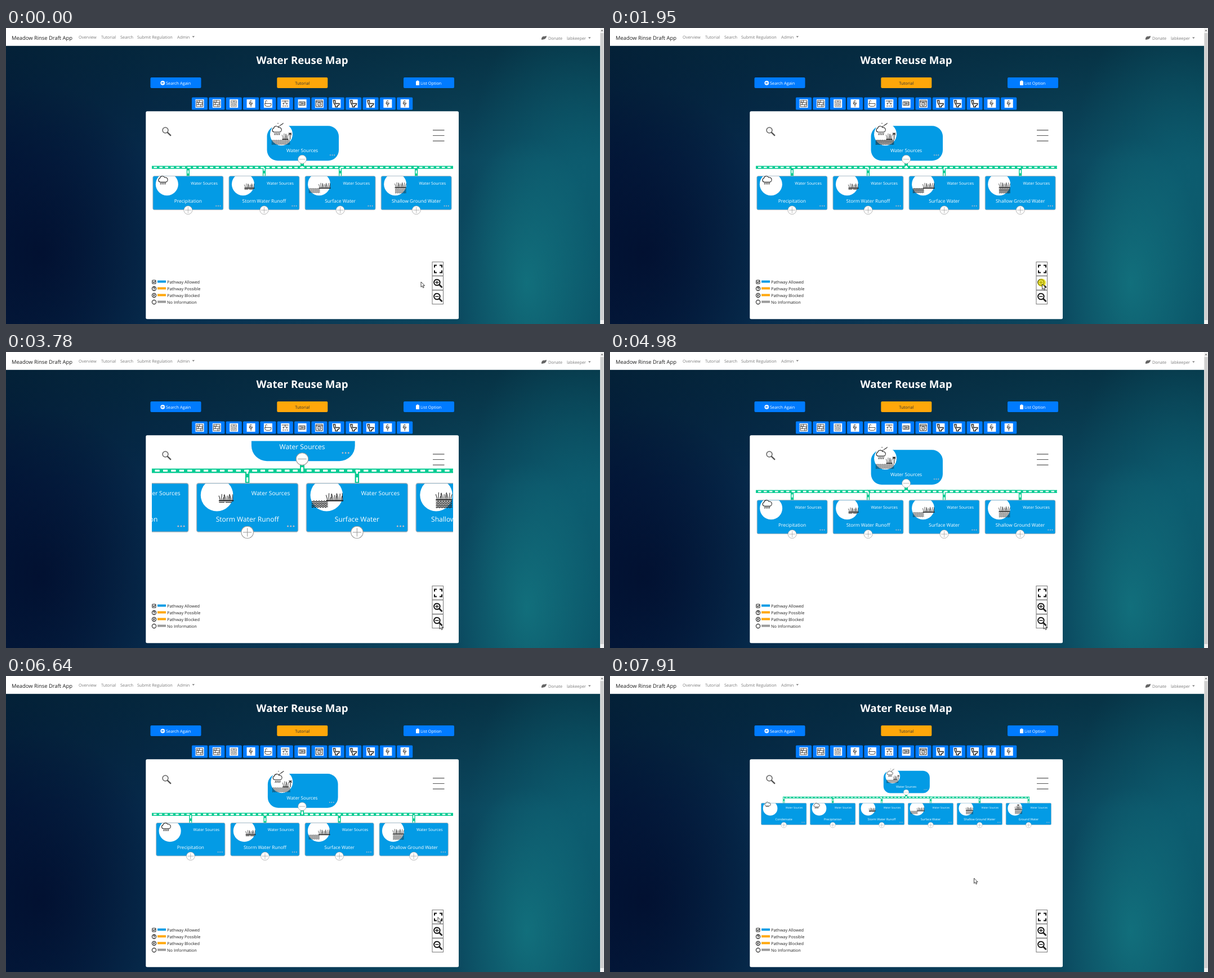
An HTML page that plays this animation: 1062x527 px, repeating every 8 s.

```html
<!DOCTYPE html>
<html lang="en">
<head>
<meta charset="utf-8">
<title>Water Reuse Map</title>
<style>
  html, body { margin: 0; width: 100%; height: 100%; overflow: hidden; }
  body {
    background:
      radial-gradient(ellipse 130px 260px at 925px 455px, rgba(22,130,138,.6), transparent),
      radial-gradient(ellipse 190px 330px at 1010px 270px, rgba(14,100,118,.6), transparent),
      radial-gradient(ellipse 230px 300px at 60px 400px, rgba(1,12,44,.75), transparent),
      linear-gradient(180deg, rgba(4,38,54,.75), transparent 45%),
      linear-gradient(97deg, #03183a 0%, #06294a 24%, #0a3a56 55%, #0b4a60 80%, #0a5568 100%);
  }
  svg { position: absolute; left: 0; top: 0; display: block; font-family: "Open Sans", "Noto Sans", sans-serif; }
  text { font-size: 7.37px; text-rendering: geometricPrecision; }
  .mid { text-anchor: middle; }
  .end { text-anchor: end; }
  .line { fill: none; stroke: #222; stroke-linecap: round; stroke-linejoin: round; }
</style>
</head>
<body>
<svg id="stage" width="1062" height="527" viewBox="0 0 1062 527"></svg>
<script>
const LOOP = 8000;
const BLUE = '#007bff', NODE = '#039be5', GREEN = '#06cb92', AMBER = '#ffa70a';

const text = (x, y, s, fill, more = '') => `<text x="${x}" y="${y}" fill="${fill}" ${more}>${s}</text>`;
const rect = (x, y, w, h, fill, more = '') => `<rect x="${x}" y="${y}" width="${w}" height="${h}" fill="${fill}" ${more}/>`;
const circle = (x, y, r, fill, more = '') => `<circle cx="${x}" cy="${y}" r="${r}" fill="${fill}" ${more}/>`;
const line = (d, w = 1, more = '') => `<path class="line" d="${d}" stroke-width="${w}" ${more}/>`;
const at = (x, y, body) => `<g transform="translate(${x} ${y})">${body}</g>`;
const range = n => [...Array(n).keys()];

// Small pictures inside the nodes, relative to the white disc
const cloud = (x, y) => at(x, y, line('M-5 4a3.4 3.4 0 0 1-.6-6.6a4.6 4.6 0 0 1 8.6-1.4a4 4 0 0 1 2.2 8z', 1.1));
const rain = (x, y) => line(range(4).map(i => `M${x + i * 2.7} ${y}l-1 3`).join(''), 1.1);
const waves = (x, y, w, rows) => line(range(rows).map(r =>
  `M${x} ${y + r * 2.2}` + 'q.8 1.2 1.6 0t1.6 0'.repeat(Math.round(w / 3.2))).join(''), 1);
const grass = (x, y, w, h) => line(`M${x} ${y}h${w}`, 1.5) + line(range(Math.round(w / 1.7)).map(i => {
  const lean = [-1.6, .3, 1.5, -.4][i % 4], tall = h * [.75, 1, .6, .85, .95][i % 5];
  return `M${x + 1 + i * 1.7} ${y}q0 ${-tall / 2} ${lean} ${-tall}`;
}).join(''), .7);
const palm = (x, y) => line(`M${x} ${y}v-10m-2.5 2q1-2 2.5-2q1.500 0 2.500 2m-5-3h5`, 1.1);
const drops = range(9).map(i => circle(-6 + i * 37 % 10, -19.5 + i * 23 % 7, .75, '#222')).join('');

const art = {
  root: drops + cloud(-8, -8) + rain(-11, -2) + grass(2, 9, 10, 10) + palm(15.5, 9) + waves(-17, 11, 32, 4),
  condensate: cloud(-7, -11) + line('M-12-5h8', 1),
  rain: cloud(-7, -8) + rain(-10.500, -3),
  runoff: grass(3, 7, 17, 8) + line('M3 9h6m2 0h7', 1),
  surface: waves(-18, 8, 18, 4) + grass(0, 7, 20, 9),
  shallow: grass(0, 6, 19, 9) + waves(0, 8.500, 18, 4),
  ground: palm(9, 1) + grass(0, 3, 19, 9) + waves(0, 5.500, 18, 5)
};

// The tree: origin on the trunk line below the root
const children = [
  ['Condensate', 'condensate'], ['Precipitation', 'rain'], ['Storm Water Runoff', 'runoff'],
  ['Surface Water', 'surface'], ['Shallow Ground Water', 'shallow'], ['Ground Water', 'ground']
].map(([name, pic], i) => ({ name, pic, x: (i - 2.5) * 135.1 }));

const toggle = (x, y, sign) => at(x, y, circle(0, 0, 7.500, '#fff', 'stroke="#999" stroke-width=".7"') +
  line(sign, .7, 'style="stroke:#999"'));
const more = (x, y) => range(3).map(i => circle(x + (i - 1) * 3.6, y, .95, '#c6bcc6')).join('');
const label = 'style="font-size:8.4px"', small = 'style="font-size:7.1px"';

function child({ name, pic, x }) {
  return at(x, 0,
    rect(-62.5, 15.5, 125, 60, NODE, 'rx="2.5" stroke="#a8b4bc" stroke-width=".9"') +
    `<g clip-path="url(#card)">${circle(-37.5, 30, 20, '#fff')}</g>` + at(-37.500, 30, art[pic]) +
    text(52.5, 30.5, 'Water Sources', '#fff', `class="end" ${small}`) +
    text(0, 63, name, '#fff', `class="mid" ${label}`) +
    more(53.5, 68.5) + toggle(0, 76, 'M-5 0h10M0-5v10'));
}

const links = children.map(c => `M0-12V0H${c.x}V16`);
const tree =
  links.map(d => `<path d="${d}" fill="none" stroke="${GREEN}" stroke-width="5.2"/>`).join('') +
  '<g id="dashes" fill="none" stroke="#fff" stroke-width="2.2" stroke-dasharray="5.5 4.5">' +
  links.map(d => `<path d="${d}"/>`).join('') + '</g>' +
  rect(-62.5, -74, 127.500, 62, NODE, 'rx="19"') +
  circle(-37, -59, 20, '#fff') + at(-37, -59, art.root) +
  text(0, -27, 'Water Sources', '#fff', `class="mid" ${label}`) +
  more(53.5, -22) + toggle(0, -14.5, 'M-5 0h10') +
  children.map(child).join('');

// Toolbar of use icons, each in a 15 px square
const uses = {
  shelf: ['M2 2h11v11H2zM2 5.700h11M2 9.400h11M7 2v3.700M5 5.700v3.700M9.500 9.400v3.600M4 3.500v2M11 7.500h1', .8],
  dish: ['M3 2h9v11H3zM3 5h9M5 7h5v4H5zM6 3.500h3M6 9h3', .6],
  sink: ['M6 6V3q1.500-2 3 .5M4.800 6.500h5.200l-1 2.500H6zM7.500 9v4', .9],
  tub: ['M2 7.500h11v2q0 3-3 3H5q-3 0-3-3zM3 7.500V3q1.200-2 3 0', .8],
  shower: ['M2 3h11M7.500 3v4M3.500 7h2m4 0h2M4.500 7v2m6-2v2M4 11v2m3.500-2v2m3.500-2v2', .9],
  box: ['M2.500 4.500h10v6h-10zM5 5v5M7 6.500h2v2H7zM11 6v3', .9],
  washer: ['M2 2h11v11H2zM2 4.500h11M10.500 8.500a3 3 0 1 1-6 0a3 3 0 1 1 6 0M6.500 9l2-1', 1],
  toilet: ['M2 2h3.500v5.500H13q0 3-4 4l.5 2H5.500v-3L3 7zM7 7.500h6', 1.3]
};
const order = 'shelf shelf dish sink tub shower box washer toilet toilet toilet sink sink'.split(' ');
const toolbar = order.map((k, i) => at(330 + i * 30.35, 123.5,
  rect(0, 0, 28, 22, BLUE, 'rx="1.5"') + rect(6.5, 3.5, 15, 15, '#fff') + at(6.5, 3.500, line(...uses[k])))).join('');

const caret = (x, y) => `<path d="M${x} ${y}h4.600l-2.300 2.400z" fill="#777"/>`;
const nav = rect(0, 0, 1055, 31.8, '#fff') +
  text(10, 21, 'Meadow Rinse Draft App', '#1c1c1c', 'style="font-size:9.4px"') +
  [[129, 'Overview'], [169, 'Tutorial'], [203, 'Search'], [233, 'Submit Regulation'], [304, 'Admin']]
    .map(([x, s]) => text(x, 18.500, s, '#7d7d7d')).join('') + caret(330.5, 14.600) +
  '<path d="M951 18q2-4 5-3l4-1q0 4-4 6l-5 1z" fill="#666"/>' +
  text(963, 20.500, 'Donate', '#7d7d7d') + text(996, 20.5, 'labkeeper', '#7d7d7d') + caret(1034, 16.600) +
  rect(1055, 0, 7, 527, '#f1f1f1') + rect(1055.5, 9, 6, 511, '#cfcfcf') + '<path d="M1056.500 5.500l2-2.500 2 2.500z" fill="#666"/>';

const button = (x, fill) => rect(x, 88, 90, 19, fill, 'rx="2"');
const header = text(526, 64, 'Water Reuse Map', '#fff', 'class="mid" style="font-size:18.7px;font-weight:700"') +
  button(256.5, BLUE) + circle(278.3, 97.8, 3.9, '#fff') + line('M280.500 97.800h-4m1.700-1.700l-1.700 1.700 1.700 1.700', 1, `style="stroke:${BLUE}"`) +
  text(284, 100.5, 'Search Again', '#fff') +
  button(481.3, AMBER) + text(526.3, 100.5, 'Tutorial', '#333', 'class="mid"') +
  button(706, BLUE) + rect(728, 94.5, 6, 7.5, '#fff', 'rx=".8"') + rect(729.5, 93.4, 3, 2.4, '#fff', 'rx=".6"') +
  text(736, 100.500, 'List Option', '#fff');

const marks = ['M261.300 452l1.400 1.400 2.500-2.800', 'M261.700 463q0-1.300 1.300-1.300t1.300 1.200-1.300 1.400m0 1.500v.1', 'M261.600 474.600l2.800 2.800m0-2.800l-2.800 2.800', ''];
const legend = ['Allowed', 'Possible', 'Blocked', ''].map((s, i) => {
  const y = 452 + i * 12;
  const frame = i ? circle(263, y, 3.6, 'none', 'stroke="#222" stroke-width="1.1"')
    : rect(259.8, y - 3, 6.200, 6.2, 'none', 'rx="1" stroke="#222" stroke-width="1.1"');
  return frame + line(marks[i], 1.1) + rect(269, y - 2.500, 15, 4, [NODE, AMBER, AMBER, '#9a9a9a'][i]) +
    text(286, y + 2.500, s ? 'Pathway ' + s : 'No Information', '#222');
}).join('');

const lens = (y, sign) => circle(765.4, y - 1, 5.300, 'none', 'stroke="#1b1b1b" stroke-width="2"') +
  line(`M769.700 ${y + 3.300}l4 4`, 2.800) + line(`M762.800 ${y - 1}h5.200` + sign, 1.400);
const controls =
  [416.500, 441.7, 467].map(y => rect(757, y, 19.500, 24.600, '#fff', 'stroke="#777" stroke-width="1"')).join('') +
  '<path d="M761 426.500v-4h4m5 0h4v4m0 5v4h-4m-5 0h-4v-4" fill="none" stroke="#111" stroke-width="2"/>' +
  lens(454, 'm-2.600-2.600v5.200') + lens(479, '') +
  circle(283, 182, 5, '#f5f5f5', 'stroke="#666" stroke-width="1.5"') +
  line('M287 186.200l5.200 5', 2.400, 'style="stroke:#555"') +
  '<path d="M758 181.800h20.500M758 191.500h20.500M758 201.200h20.500" stroke="#555" stroke-width="1.200"/>';

const stage = document.getElementById('stage');
stage.innerHTML =
  '<defs><clipPath id="view"><rect x="259" y="158.500" width="535" height="350"/></clipPath>' +
  '<clipPath id="card"><rect x="-62.500" y="15.900" width="125" height="60"/></clipPath></defs>' +
  nav + header + toolbar + rect(248.3, 148.3, 555.700, 370, '#fff', 'rx="2.5"') +
  `<g clip-path="url(#view)"><g id="tree">${tree}</g></g>` + legend + controls +
  '<circle id="press" r="7.300" fill="#e6dc00" fill-opacity=".72"/>' +
  '<path id="cursor" d="M0 0v9.200l2.100-1.900 1.500 3.300 1.600-.7-1.500-3.200h2.900z" fill="#fff" stroke="#111" stroke-width=".8"/>';

// Zoom steps: start, duration, factor, fixed height
const zooms = [
  [1914, 1000, 1.4415, 331.5],
  [4020, 960, 1 / 1.443, 331.5],
  [6141, 2200, .6355, 158.5]
];
const presses = [[1880, 2180], [3980, 4260], [6100, 6400]];
// Pointer stops: time, x, y
const stops = [
  [0, 737, 452], [350, 737, 452], [800, 741, 459.500], [1000, 746, 460], [1550, 767.5, 456], [2750, 767.5, 456],
  [3250, 770, 484], [5050, 770, 484], [5650, 767, 429.500], [7050, 767, 429.5], [7850, 646.500, 360], [8001, 646.5, 360]
];
const clamp = u => Math.min(1, Math.max(0, u));
const cubic = u => u < .5 ? 4 * u ** 3 : 1 - 4 * (1 - u) ** 3;
const smooth = u => u * u * (3 - 2 * u);

function pointer(t) {
  const i = stops.findIndex(s => s[0] > t);
  const [t0, x0, y0] = stops[i - 1], [t1, x1, y1] = stops[i];
  const u = smooth((t - t0) / (t1 - t0));
  return [x0 + (x1 - x0) * u, y0 + (y1 - y0) * u];
}

const [treeEl, dashes, press, cursor] = ['tree', 'dashes', 'press', 'cursor'].map(id => document.getElementById(id));

function draw(t) {
  let scale = 1, y = 248.2;
  for (const [start, dur, factor, fixed] of zooms) {
    const f = factor ** cubic(clamp((t - start) / dur));
    scale *= f;
    y = fixed + (y - fixed) * f;
  }
  treeEl.setAttribute('transform', `translate(526 ${y}) scale(${scale})`);
  dashes.setAttribute('stroke-dashoffset', -t / 100);
  const [px, py] = pointer(t);
  cursor.setAttribute('transform', `translate(${px} ${py})`);
  press.setAttribute('transform', `translate(${px - .5} ${py - 2.5})`);
  press.setAttribute('visibility', presses.some(([a, b]) => t >= a && t < b) ? 'visible' : 'hidden');
}

const begin = performance.now();
function tick() {
  draw((performance.now() - begin) % LOOP);
  requestAnimationFrame(tick);
}
tick();
</script>
</body>
</html>
```
